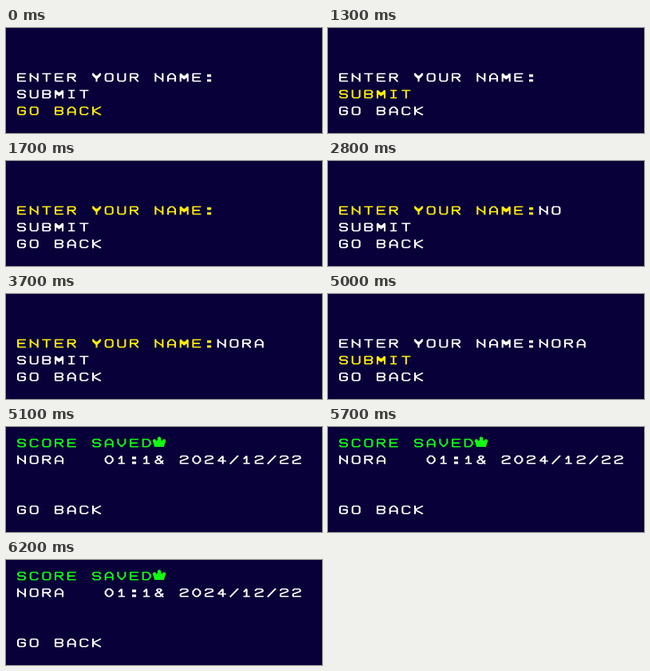
Animation of 396x132 px, one loop 7 s. Source, as an HTML page with a canvas:

```html
<!DOCTYPE html>
<html lang="en">
<head>
<meta charset="utf-8">
<title>Enter your name</title>
<style>
  html, body { margin: 0; width: 100%; height: 100%; overflow: hidden; background: #080038; }
  canvas { display: block; }
</style>
</head>
<body>
<canvas id="stage" width="396" height="132" role="img"></canvas>
<script>
const LOOP = 7000, PITCH = 15.67, LINE = 21;
const BACK = '#080038', WHITE = '#fff', YELLOW = '#ffec08', GREEN = '#12ff12';

// Stroke font: each word is a polyline of xy pairs on a 7 by 7 grid.
const GLYPHS = {
  A: '060220406266 0464',
  B: '0353626150000656656453',
  C: '6150100105165665',
  D: '00406264460600',
  E: '60000666 0353',
  G: '61501001051656656333',
  I: '1050 3036 1656',
  K: '0006 600366',
  M: '0600336066 0133 3361 0234 3462 1252',
  N: '0600 0165 6066',
  O: '105061655616050110',
  R: '06005061625303 3366',
  S: '615010010213536465561605',
  T: '0060 3036',
  U: '000516566560',
  V: '0003366360',
  Y: '003360 013461 1252 3336',
  0: '204062644626040220',
  1: '123036 1656',
  2: '0110506162040666',
  4: '46400464',
  8: '662211204051420405164664',
  '/': '0660',
  ':': '2141 2242 2545 2646'
};

const stage = document.getElementById('stage');
const ctx = stage.getContext('2d');
ctx.lineWidth = 1.6;
ctx.lineCap = 'square';
ctx.lineJoin = 'bevel';

function write(text, column, row, color) {
  ctx.strokeStyle = color;
  ctx.beginPath();
  [...text].forEach((char, i) => {
    const left = 15 + (column + i) * PITCH, top = 15.5 + row * LINE;
    for (const line of (GLYPHS[char] || '').split(' '))
      for (let k = 0; k + 1 < line.length; k += 2)
        ctx[k ? 'lineTo' : 'moveTo'](left + line[k] * 1.5, top + line[k + 1] * 1.55);
  });
  ctx.scale(1.3, 1); // wide pen: uprights heavier than crossbars
  ctx.stroke();
  ctx.resetTransform();
}

function crown(x, y) {
  ctx.fillStyle = GREEN;
  ctx.beginPath();
  for (const [dx, dy] of [[-8, -2], [-3, -1], [-1, -5], [1, -5], [3, -1], [8, -2], [6, 6.5], [-6, 6.5]])
    ctx.lineTo(x + dx, y + dy);
  ctx.fill();
  for (const [dx, dy] of [[-6, -1], [0, -4], [6, -1]]) {
    ctx.beginPath();
    ctx.arc(x + dx, y + dy, 2.2, 0, 7);
    ctx.fill();
  }
}

const NAME = 'NORA', KEY_TIMES = [2400, 2800, 3400, 3700];

function drawForm(t) {
  const selected = t < 1300 ? 2 : t < 1700 ? 1 : t < 4300 ? 0 : 1;
  ['ENTER YOUR NAME:', 'SUBMIT', 'GO BACK'].forEach((label, i) =>
    write(label, 0, 2 + i, i === selected ? YELLOW : WHITE));
  write(NAME.slice(0, KEY_TIMES.filter(key => t >= key).length), 16, 2, WHITE);
}

function drawSaved() {
  write('SCORE SAVED', 0, 0, GREEN);
  crown(192, 18.5);
  write(NAME + '   01:18 2024/12/22', 0, 1, WHITE);
  write('GO BACK', 0, 4, WHITE);
}

function render() {
  const t = performance.now() % LOOP;
  ctx.fillStyle = BACK;
  ctx.fillRect(0, 0, 396, 132);
  if (t < 5100) drawForm(t);
  else drawSaved();
  stage.setAttribute('aria-label', t < 5100 ? 'Enter your name' : 'Score saved');
  requestAnimationFrame(render);
}
render();
</script>
</body>
</html>
```
